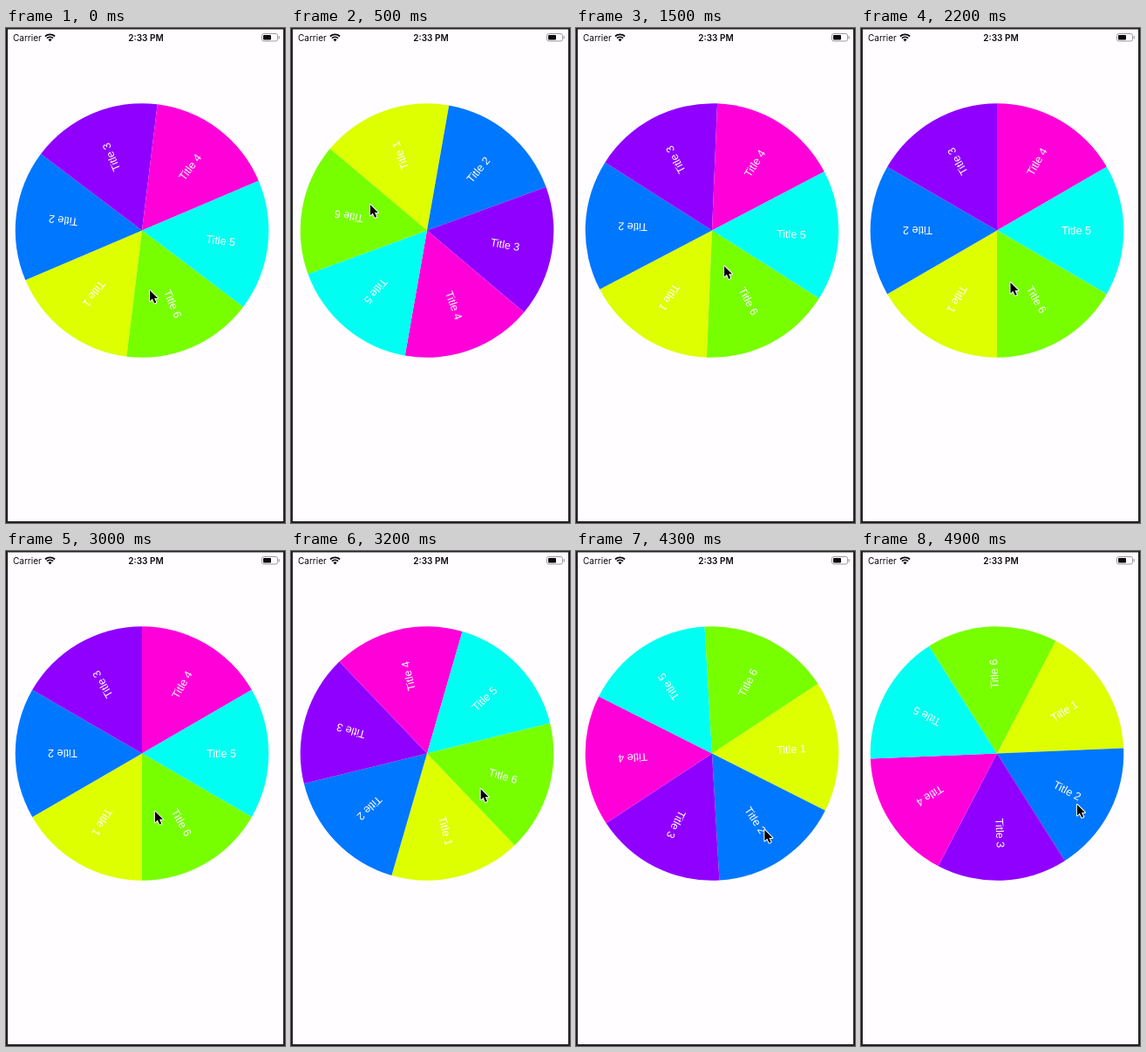
Write an HTML page with a canvas that moves like this. It is 320 px wide and 566 px high and loops after 5 s.

```html
<!DOCTYPE html>
<html lang="en">
<head>
<meta charset="utf-8">
<title>Spinning wheel</title>
<style>
  html, body { margin: 0; width: 100%; height: 100%; overflow: hidden; background: #fffdff; }
  canvas { display: block; width: 320px; height: 566px; }
</style>
</head>
<body>
<canvas id="stage"></canvas>
<script>
const W = 320, H = 566, LOOP = 5000, STEP = 100;
const CX = 156, CY = 231.5, R = 145.3;
const INK = '#0b0a0c';
const COLORS = ['#ddff00', '#0077ff', '#9000ff', '#ff00d9', '#00fff2', '#77ff00'];

// time, wheel angle, pointer angle, pointer radius (degrees clockwise from the right)
const KEYS = [
  [0, 127, 82.5, 69],
  [500, 250, 204.4, 71.5],
  [1000, 244, 186.4, 76.5],
  [1500, 122.4, 70.9, 43],
  [1900, 120, 75, 60],
  [3000, 120, 77.3, 68],
  [3450, 15, -28, 82],
  [3700, 8.7, 55.6, 106],
  [4200, 0, 58, 106],
  [4700, -32, 33, 109],
  [4900, -32.4, 32.5, 109],
  [5000, -32.4, 32.5, 109]
];

const canvas = document.getElementById('stage');
const ctx = canvas.getContext('2d');
const dpr = window.devicePixelRatio || 1;
canvas.width = W * dpr;
canvas.height = H * dpr;

const rad = deg => deg * Math.PI / 180;
const smooth = u => u * u * (3 - 2 * u);

function poseAt(t) {
  let i = 0;
  while (i < KEYS.length - 2 && t >= KEYS[i + 1][0]) i++;
  const a = KEYS[i], b = KEYS[i + 1];
  const u = smooth((t - a[0]) / (b[0] - a[0]));
  const [, wheel, angle, radius] = a.map((v, k) => v + (b[k] - v) * u);
  return {
    wheel,
    x: CX + radius * Math.cos(rad(angle)),
    y: CY + radius * Math.sin(rad(angle))
  };
}

function text(str, x, y, font, align, color) {
  ctx.font = font;
  ctx.textAlign = align;
  ctx.fillStyle = color;
  ctx.fillText(str, x, y);
}

function drawBackdrop() {
  ctx.fillStyle = '#231f22';
  ctx.fillRect(0, 0, W, H);
  ctx.fillStyle = '#fffdff';
  ctx.fillRect(2, 1.5, W - 4, H - 3.5);
}

function drawWifi(x, y) {
  ctx.strokeStyle = ctx.fillStyle = INK;
  ctx.lineWidth = 1.8;
  for (const r of [5.2, 8.2]) {
    ctx.beginPath();
    ctx.arc(x, y, r, rad(-133), rad(-47));
    ctx.stroke();
  }
  ctx.beginPath();
  ctx.moveTo(x, y);
  ctx.arc(x, y, 3, rad(-133), rad(-47));
  ctx.fill();
}

function drawBattery() {
  ctx.strokeStyle = '#9b999c';
  ctx.lineWidth = 1;
  ctx.beginPath();
  ctx.roundRect(293.5, 6.5, 18, 8.5, 2.2);
  ctx.stroke();
  ctx.fillStyle = '#9b999c';
  ctx.fillRect(312.6, 9.2, 1.2, 3.2);
  ctx.fillStyle = INK;
  ctx.beginPath();
  ctx.roundRect(295, 8, 9, 5.5, 1);
  ctx.fill();
}

function drawStatus() {
  text('Carrier', 8, 14.7, '10px Inter, sans-serif', 'left', INK);
  text('2:33 PM', 160.5, 14.7, '600 10px Inter, sans-serif', 'center', INK);
  drawWifi(50.5, 15.5);
  drawBattery();
}

function drawWheel(angle) {
  COLORS.forEach((color, i) => {
    ctx.save();
    ctx.translate(CX, CY);
    ctx.rotate(rad(angle + i * 60));
    ctx.beginPath();
    ctx.moveTo(0, 0);
    ctx.arc(0, 0, R, rad(-30), rad(30));
    ctx.closePath();
    ctx.fillStyle = color;
    ctx.fill();
    text('Title ' + (i + 1), 91, 4.8, '12.6px "Liberation Sans", Arial, sans-serif', 'center', '#fff');
    ctx.restore();
  });
}

const arrow = new Path2D('M0 0V12.4L2.9 9.7 5.2 14.8 7.3 13.9 5.1 9H9Z');

function drawPointer(x, y) {
  ctx.save();
  ctx.translate(x, y);
  ctx.lineJoin = 'round';
  ctx.lineWidth = 2;
  ctx.strokeStyle = '#fff';
  ctx.stroke(arrow);
  ctx.fillStyle = '#000';
  ctx.fill(arrow);
  ctx.restore();
}

function frame(now) {
  const t = Math.floor((now % LOOP) / STEP) * STEP;
  const pose = poseAt(t);
  ctx.setTransform(dpr, 0, 0, dpr, 0, 0);
  drawBackdrop();
  drawStatus();
  drawWheel(pose.wheel);
  drawPointer(pose.x, pose.y);
}

const start = performance.now();
function tick() {
  frame(performance.now() - start);
  requestAnimationFrame(tick);
}
tick();
</script>
</body>
</html>
```
